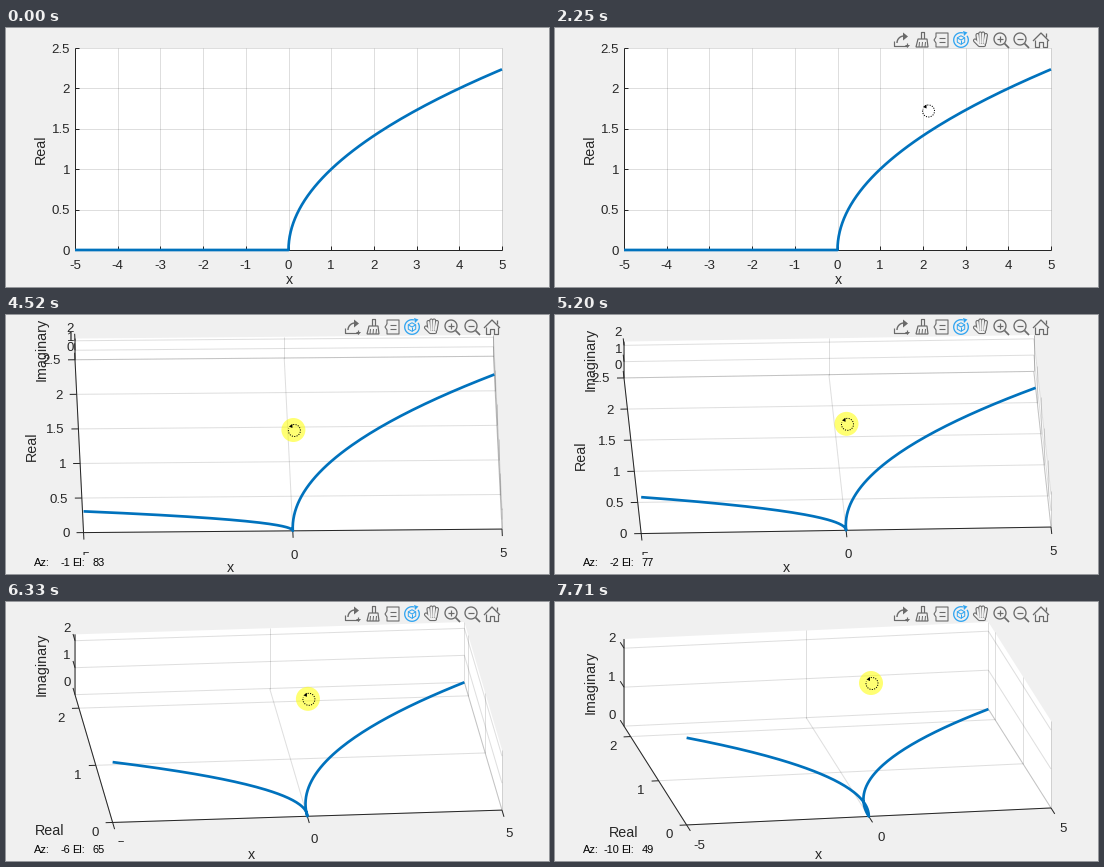
These frames come from a looping animation (543 by 259 pixels, 8000 ms). A matplotlib script:

```python
import numpy as np
import matplotlib.pyplot as plt
from matplotlib.animation import FuncAnimation
from matplotlib.collections import LineCollection
from matplotlib.lines import Line2D
from matplotlib.patches import Circle, Polygon, Rectangle

W, H, INTERVAL, LOOP = 543, 259, 20, 8000
LEFT, RIGHT, TOP = 69, 496, 20
ROOT = np.sqrt(5)
BACK, DARK, ICON = "#f0f0f0", "#262626", "#6a6a6a"
BLUE, ACTIVE = "#0072bd", "#2fa4f0"

# the screen refreshes at a fixed pace while the pointer moves: start ms -> steps
PACE = 113.3
BURSTS = {550: 22, 3610: 2, 3940: 2, 4280: 3, 4740: 5, 5530: 20}
TIMES = np.concatenate([t + PACE * np.arange(n) for t, n in BURSTS.items()])
TOOLBAR, CLICK, DRAG = 2, 10, 22

# pointer path: step, x, y
PATH = np.array([(0, 510, 238), (7, 432, 50), (10, 406, 14), (11, 406, 14),
                 (15, 373.5, 83), (21, 285.5, 121.5), (22, 285.5, 121.5),
                 (28, 288.4, 115.5), (38, 296.6, 103.2), (45, 311.3, 89.5),
                 (53, 317, 81.5)])

fig = plt.figure(figsize=(W / 72, H / 72), dpi=72, facecolor=BACK)
ax = fig.add_axes([0, 0, 1, 1])
ax.set(xlim=(0, W), ylim=(H, 0))
ax.axis("off")
drawn = []
shown = {"step": None}


def add(artist):
    artist.set_zorder(len(drawn) + 1)
    drawn.append(ax.add_artist(artist))


def stroke(points, color=DARK, width=1.0, cap="butt", **style):
    x, y = np.transpose(points)
    add(Line2D(x, y, color=color, lw=width, solid_capstyle=cap, **style))


def shape(points, color, edge="none", width=0.8):
    add(Polygon(points, closed=True, fc=color, ec=edge, lw=width))


def arc(x, y, r, start=0, stop=360, count=40):
    a = np.radians(np.linspace(start, stop, count))
    return np.c_[x + r * np.cos(a), y + r * np.sin(a)]


def label(x, y, text, size=13.3, ha="center", color=DARK, rotated=False):
    if rotated:
        place = dict(rotation=90, va="center")
    else:
        place = dict(va="baseline")
        y += 0.34 * size
    artist = ax.text(x, y, text, fontsize=size, ha=ha, color=color,
                     family="Liberation Sans", **place)
    artist.set_zorder(len(drawn) + 1)
    drawn.append(artist)


def projector(el, az, bottom, limit):
    """Orthographic view of the data box, stretched to fill the plot area."""
    el, az = np.radians([el, az])
    c, s = np.cos(az), np.sin(az)
    width, height = c - s, np.sin(el) * (c - s) + np.cos(el)

    def project(x, y, z):
        u, v, w = (np.asarray(x) + 5) / 10, y / limit, z / ROOT
        px = LEFT + (RIGHT - LEFT) * (u * c + (v - 1) * s) / width
        up = (np.sin(el) * (v * c - u * s) + np.cos(el) * w) / height
        return np.stack([px, bottom - (bottom - TOP) * up], axis=-1)
    return project


def unit(a, b):
    return (b - a) / np.hypot(*(b - a))


def tick(point, direction, length):
    stroke([point, point + length * np.asarray(direction)])


def grid(project, xs, ys, zs, limit):
    lines = []
    for x in xs:
        lines += [[(x, 0, 0), (x, limit, 0)], [(x, limit, 0), (x, limit, ROOT)]]
    for y in ys:
        lines += [[(-5, y, 0), (5, y, 0)], [(5, y, 0), (5, y, ROOT)]]
    for z in zs:
        lines += [[(-5, limit, z), (5, limit, z)], [(5, limit, z), (5, 0, z)]]
    flat = [[project(*p), project(*q)] for p, q in lines]
    add(LineCollection(flat, colors=DARK, alpha=0.15, linewidths=1))


def curve(project):
    s = np.linspace(-1, 1, 161)
    x = 5 * s * abs(s)
    stroke(project(x, np.sqrt(np.maximum(x, 0)), np.sqrt(np.maximum(-x, 0))),
           BLUE, 2.7)


def flat_plot():
    bottom = 222
    project = projector(90, 0, bottom, 2.5)
    xs, ys = range(-5, 6), np.arange(0, 2.6, 0.5)
    add(Rectangle((LEFT, TOP), RIGHT - LEFT, bottom - TOP, fc="white", ec="none"))
    grid(project, xs, ys, [], 2.5)
    stroke([(LEFT, TOP), (LEFT, bottom), (RIGHT, bottom)])
    for x in xs:
        p = project(x, 0, 0)
        tick(p, (0, -1), 4)
        label(p[0], bottom + 14, f"{x}")
    for y in ys:
        p = project(-5, y, 0)
        tick(p, (1, 0), 4)
        label(LEFT - 5, p[1], f"{y:g}", ha="right")
    curve(project)
    label(283, 251.5, "x", 14.3)
    label(35, 121, "Real", 14.3, rotated=True)


def tilted_plot(el, az):
    tilt = 90 - el
    steep, deep = el > 67.5, el < 87.5
    limit = 2.5 if steep else ROOT
    xs = (-5, 0, 5) if deep else range(-5, 6)
    ys = np.arange(0, 2.6, 0.5) if steep else range(3)
    zs = range(3)
    project = projector(el, az, 216.5 + 0.157 * tilt, limit)

    corners = [(-5, 0, 0), (-5, limit, 0), (-5, limit, ROOT),
               (5, limit, ROOT), (5, 0, ROOT), (5, 0, 0)]
    outline = [project(*p) for p in corners]
    front, back, peak, right = outline[0], outline[1], outline[2], outline[5]
    shape(outline, "white")
    grid(project, xs, ys, zs, limit)
    stroke([right, front, back, peak])

    forward, sideways = unit(back, front), unit(right, front)
    for x in xs:
        p = project(x, 0, 0)
        tick(p, forward, 7)
        label(*(p + 23.5 * forward), f"{x}")
    for y in ys:
        p = project(-5, y, 0)
        tick(p, sideways, 7)
        label(p[0] - 14, p[1] + (0 if steep else 9), f"{y:g}", ha="right")
    if deep:
        for z in zs:
            p = project(-5, limit, z)
            tick(p, -forward, 7)
            label(*(p - 15 * forward + (-4, 1.5)), f"{z}")
        label(35.5, (back[1] + peak[1]) / 2, "Imaginary", 14.3, rotated=True)
    curve(project)

    label(217 + 1.12 * tilt, 252, "x", 14.3)
    if steep:
        label(26, (front[1] + back[1]) / 2, "Real", 14.3, rotated=True)
    else:
        label(front[0] - 63, front[1] + 7.5, "Real", 14.3)

    add(Rectangle((19, 240), 100, 18, fc=BACK, ec="none"))
    for x, text, ha in [(27.5, "Az:", "left"), (64, f"{round(az)}", "right"),
                        (66, "El:", "left"), (99, f"{round(el)}", "right")]:
        label(x, 247, text, 11, ha, "black")


def export_icon():
    stroke([(339, 13), (339, 18), (352, 18), (352, 15)], ICON, 1.2)
    stroke(arc(349, 15, 7, 180, 270), ICON, 1.4)
    shape([(348, 4.5), (353, 8.5), (348, 12.5)], ICON)
    shape([(350, 17), (355, 17), (352.5, 20)], ICON)


def brush_icon():
    stroke([(366, 11), (366, 4), (369, 4), (369, 11)], ICON, 1.2)
    shape([(363, 11), (372, 11), (373, 19), (361, 19)], BACK, ICON, 1.2)
    for x in (364, 367, 370):
        stroke([(x + 0.5, 14), (x, 19)], ICON)


def tip_icon():
    stroke([(381, 9), (381, 5), (393, 5), (393, 19), (381, 19), (381, 15),
            (379, 12), (381, 9)], ICON, 1.1)
    for y in (10, 14):
        stroke([(384, y), (390, y)], ICON, 1.1)


def rotate_icon(tone):
    stroke(arc(406, 12, 7.3, -35, 285), tone, 1.3)
    shape([(408, 3), (412.5, 4.5), (409, 8)], tone)
    cube = arc(406, 12, 4.3, -90, 270, 7)
    stroke(cube, tone)
    for corner in cube[1::2]:
        stroke([(406, 12), corner], tone)


def hand_icon():
    # wide strokes with a light core read as outlined fingers
    for tone, width in ((ICON, 4.2), (BACK, 2)):
        for i in range(4):
            stroke([(422.5 + 2.8 * i, 7 - 1.5 * (i in (1, 2))),
                    (423.5 + 2 * i, 15)], tone, width, "round")
        stroke([(420, 12.5), (424.5, 17), (429, 17)], tone, width, "round")


def zoom_icon(x, plus):
    stroke(arc(x, 11, 6), ICON, 1.3)
    stroke([(x + 4.5, 15.5), (x + 9, 20)], ICON, 1.7)
    stroke([(x - 3, 11), (x + 3, 11)], ICON, 1.2)
    if plus:
        stroke([(x, 8), (x, 14)], ICON, 1.2)


def home_icon():
    stroke([(478, 13), (486, 5), (494, 13)], ICON, 1.3)
    stroke([(480, 12), (480, 19), (484, 19), (484, 14), (488, 14), (488, 19),
            (492, 19), (492, 12)], ICON, 1.2)
    stroke([(491, 9), (491, 5)], ICON, 1.3)


def toolbar(active):
    export_icon()
    brush_icon()
    tip_icon()
    rotate_icon(ACTIVE if active else ICON)
    hand_icon()
    zoom_icon(445, True)
    zoom_icon(465, False)
    home_icon()


def pointer(step, x, y):
    if step == CLICK or step >= DRAG:
        add(Circle((x - 1, y - 0.5), 12, fc="#ffff00", ec="none", alpha=0.55))
    if step > CLICK + 1:
        stroke(arc(x, y, 6, -125, 200), "black", 1, linestyle=(0, (1.1, 1.3)),
               dash_capstyle="butt")
        shape(np.add([(-5.5, -4), (-2, -6.5), (-2, -2.5)], (x, y)), "black")
    else:
        tip = [(0, 0), (0, 16), (4, 12.5), (6.5, 18), (9, 17), (6.5, 11.5), (11, 11)]
        shape(np.add(tip, (x, y)), "white", "black", 1)


def update(frame):
    time = frame * INTERVAL + INTERVAL / 2
    step = int(np.searchsorted(TIMES, time, side="right")) - 1
    if step == shown["step"]:
        return drawn
    shown["step"] = step
    for artist in drawn:
        artist.remove()
    drawn.clear()

    x, y = (np.interp(step, PATH[:, 0], PATH[:, i]) for i in (1, 2))
    if step < DRAG:
        flat_plot()
    else:
        # the drag turns the view in proportion to the pointer's travel
        tilted_plot(el=y - 32.5, az=-0.3 * (x - 284.5))
    if step >= TOOLBAR:
        toolbar(step > CLICK)
    if step >= 0:
        pointer(step, x, y)
    return drawn


animation = FuncAnimation(fig, update, frames=LOOP // INTERVAL,
                          interval=INTERVAL, repeat=True, repeat_delay=0)
plt.show()
```
